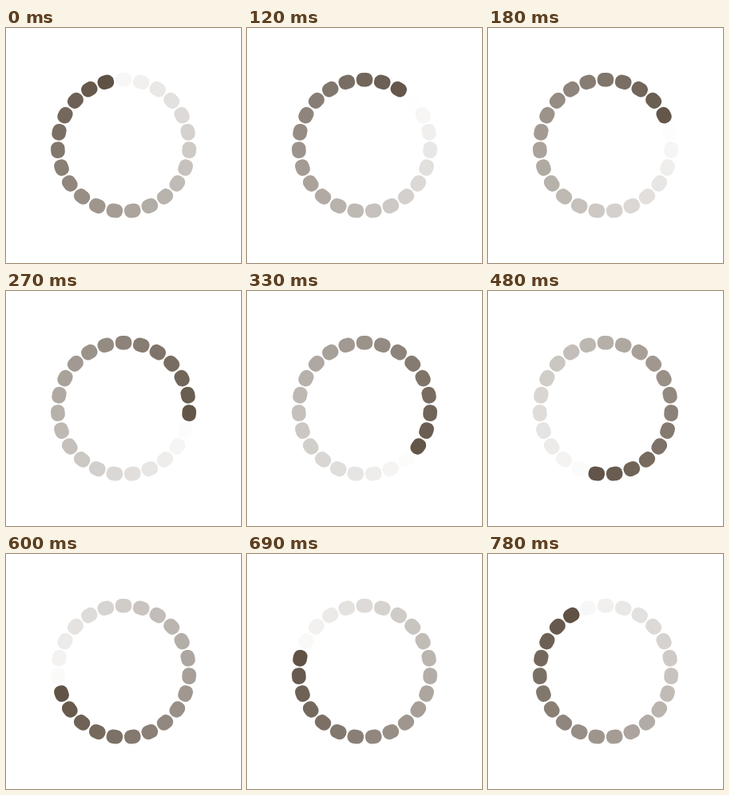
An HTML page for the animation above (840 ms loop, 294 px wide and 294 px high).

```html
<!DOCTYPE html>
<html lang="en">
<head>
<meta charset="utf-8">
<title>Loading ring</title>
<style>
  html, body { margin: 0; width: 100%; height: 100%; overflow: hidden; background: #fff; }
  svg { display: block; width: 294px; height: 294px; }
  rect { fill: #5f5144; }
</style>
</head>
<body>
<svg viewBox="0 0 294 294"><g id="ring" transform="translate(147 147)"></g></svg>
<script>
  const COUNT = 23, STEPS = 24, LOOP = 840;
  const RADIUS = 82.3, WIDTH = 20.5, HEIGHT = 17.5;
  const ring = document.getElementById('ring');

  const dots = Array.from({ length: COUNT }, (_, i) => {
    const dot = document.createElementNS('http://www.w3.org/2000/svg', 'rect');
    const attrs = {
      x: -WIDTH / 2, y: -RADIUS - HEIGHT / 2,
      width: WIDTH, height: HEIGHT, rx: 8,
      transform: `rotate(${i * 360 / COUNT})`
    };
    for (const name in attrs) dot.setAttribute(name, attrs[name]);
    return ring.appendChild(dot);
  });

  // 30 ms ticks; every seventh tick holds the previous step
  const stepAt = t => Math.min(STEPS - 1, Math.floor(t / 30) - Math.floor(t / 210));

  let shown = -1;
  function draw(now) {
    const step = stepAt(now % LOOP);
    if (step !== shown) {
      shown = step;
      const head = COUNT - 1 + step * COUNT / STEPS;
      dots.forEach((dot, i) => {
        const age = (head - i) % COUNT;
        dot.setAttribute('opacity', 1 - age / COUNT);
      });
    }
  }

  const start = performance.now();
  function tick() {
    draw(performance.now() - start);
    requestAnimationFrame(tick);
  }
  tick();
</script>
</body>
</html>
```
